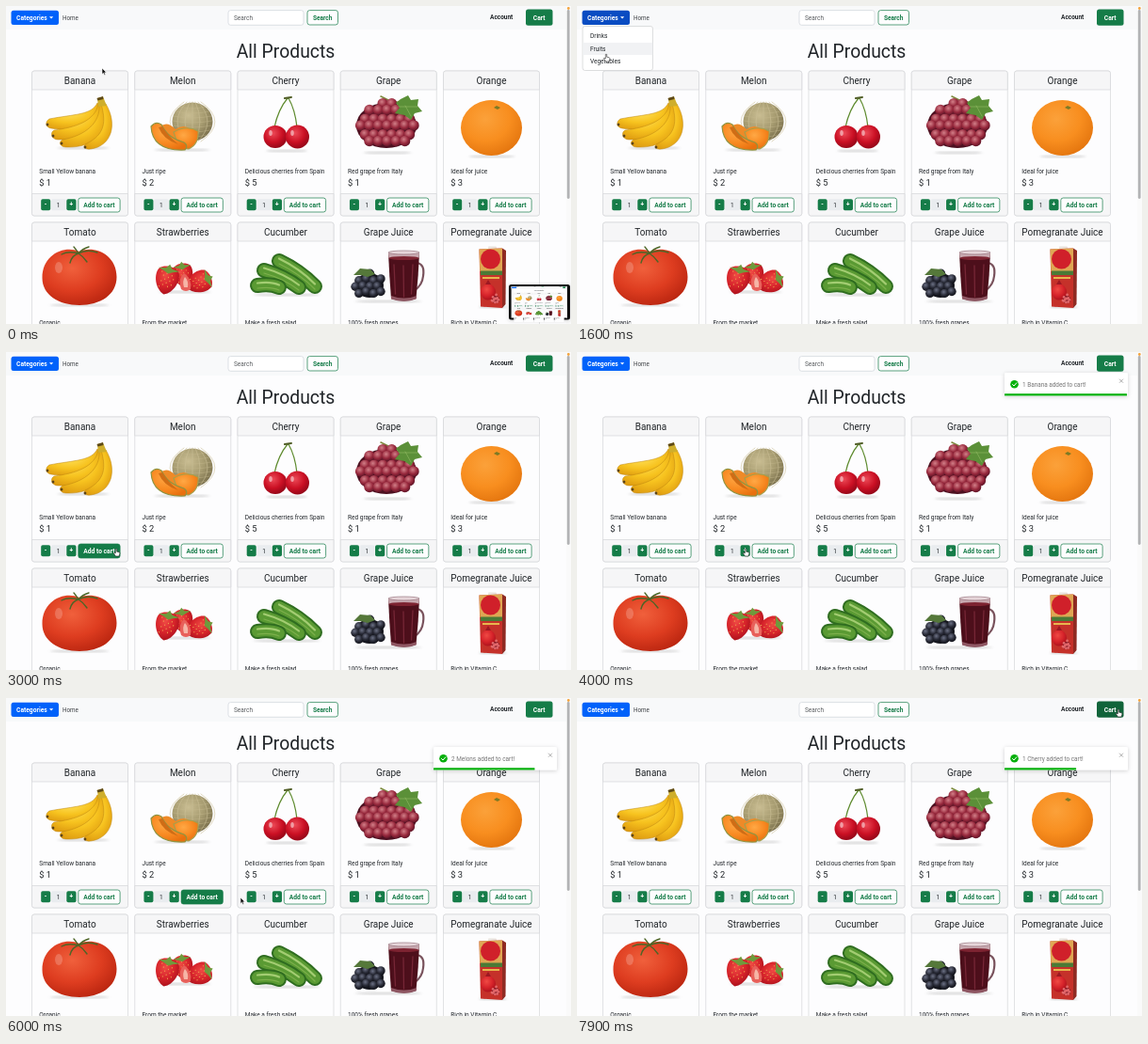
An HTML page for the animation above (8 s loop, 600 px wide and 338 px high).

```html
<!DOCTYPE html>
<html lang="en">
<head>
<meta charset="utf-8">
<title>All Products</title>
<style>
html,body{margin:0;width:100%;height:100%;overflow:hidden;background:#fdfdfe}
svg{display:block;width:600px;height:338px;font-family:Roboto,"Open Sans",sans-serif}
text{white-space:pre}
</style>
</head>
<body>
<svg id="stage" viewBox="0 0 600 338"></svg>
<script>
const LOOP = 8000, GREEN = '#157c48', BLUE = '#0062fa', INK = '#212529';
const stage = document.getElementById('stage');

const text = (x, y, s, size = 6.5, o = '') => `<text x="${x}" y="${y}" font-size="${size}" fill="${INK}" ${o}>${s}</text>`;
const rect = (x, y, w, h, fill, r = 0, o = '') => `<rect x="${x}" y="${y}" width="${w}" height="${h}" rx="${r}" fill="${fill}" ${o}/>`;
const path = (d, fill, o = '') => `<path d="${d}" fill="${fill}" ${o}/>`;
const oval = (x, y, rx, ry, fill, o = '') => `<ellipse cx="${x}" cy="${y}" rx="${rx}" ry="${ry}" fill="${fill}" ${o}/>`;
const line = (d, color, w, o = '') => path(d, 'none', `stroke="${color}" stroke-width="${w}" stroke-linecap="round" ${o}`);
const MID = 'text-anchor="middle" ', BOLD = 'font-weight="600" ';
const white = 'style="fill:#fff"', green = `style="fill:${GREEN}"`;

const ball = (id, a, b, c) => `<radialGradient id="${id}" cx=".4" cy=".34" r=".72"><stop stop-color="${a}"/><stop offset=".55" stop-color="${b}"/><stop offset="1" stop-color="${c}"/></radialGradient>`;
const defs = `<defs>
${ball('yellow', '#ffe25e', '#f7c31f', '#dd990f')}${ball('rind', '#c9bd92', '#a69b70', '#756b48')}
${ball('flesh', '#ffa845', '#f88a22', '#e8700f')}${ball('cherry', '#ec4a57', '#cb1024', '#8b0516')}
${ball('grape', '#d27f88', '#98293d', '#541022')}${ball('orange', '#fba13a', '#f88e1f', '#e2730d')}
${ball('tomato', '#f0603c', '#de3d20', '#b8240f')}${ball('berry', '#ef4a44', '#d6232a', '#a50f1b')}
${ball('black', '#6b7084', '#282a36', '#0e0f15')}
<filter id="shade" x="-20%" y="-40%" width="140%" height="200%"><feDropShadow dx="0" dy="1" stdDeviation="2" flood-opacity=".18"/></filter>
<filter id="soft"><feGaussianBlur stdDeviation="1.2"/></filter>
<clipPath id="view"><rect width="594.5" height="338"/></clipPath></defs>`;

const shadow = (x, y, rx) => oval(x, y, rx, 1.6, '#bbb', 'opacity=".5" filter="url(#soft)"');

// Hexagonally packed berries inside an ellipse, over a dark core
function cluster(cx, cy, rx, ry, r, fill, core) {
  let out = oval(cx, cy, rx, ry, core);
  for (let row = 0, y = cy - ry; y <= cy + ry; y += r * 1.45, row++)
    for (let x = cx - rx + (row % 2) * r * .8; x <= cx + rx; x += r * 1.65)
      if (((x - cx) / rx) ** 2 + ((y - cy) / ry) ** 2 < 1.05) out += oval(x.toFixed(1), (y + Math.sin(x * 2)).toFixed(1), r, r, fill);
  return out;
}

const banana = () => {
  const skin = 'stroke="#bd850f" stroke-width=".5"';
  return shadow(82, 151, 28) + [
    'M97 103C91 116 72 115 46 120C41 123 42 129 48 130C76 135 96 126 103 106Z',
    'M98 104C95 122 74 129 51 132C46 135 49 142 55 142C80 143 100 132 104 106Z',
    'M99 104C101 124 84 138 60 142C55 145 58 150 64 150C92 151 110 136 106 105Z',
    'M101 104C106 122 106 136 86 146C80 149 84 153 90 152C112 149 119 126 106 104Z'
  ].map(d => path(d, 'url(#yellow)', skin)).join('') +
    path('M97 98L103 96.500L107 106L98 107Z', '#cfae2c') + path('M96.500 98L103 96L103.500 99L97.500 100.500Z', '#5e4a18') +
    [[44, 126], [50, 138], [59, 146], [84, 150]].map(([x, y]) => oval(x, y, 1.4, 1.6, '#5c4318')).join('');
};

const melon = () => {
  let net = '';
  for (let i = -3; i <= 3; i++) net += line(`M${198 + i * 3} 102Q${198 + i * 13} 123 ${198 + i * 3} 144`, '#cbbf97', .6);
  for (let y = 107; y < 142; y += 5) net += line(`M${198 - Math.sqrt(440 - (y - 123) ** 2)} ${y}Q198 ${y + 4} ${198 + Math.sqrt(440 - (y - 123) ** 2)} ${y}`, '#c4b88d', .4);
  return shadow(187, 153, 30) + oval(198, 123, 21.5, 20.5, 'url(#rind)') + net +
    path('M162 129Q171 121 180 131Q189 125 196 131Q191 142 180 144Q167 140 162 129Z', '#ee8a28') +
    path('M178 134Q192 126 204 133Q205 147 194 152Q183 152 178 134Z', 'url(#flesh)', 'stroke="#a3a04d" stroke-width="1.1"') +
    path('M154 128C155 146 168 154 190 153C193 150 192 147 189 145C176 141 170 136 165 126Q159 122 154 128Z', 'url(#flesh)', 'stroke="#8f9440" stroke-width="1.2"') +
    path('M162 129Q167 142 183 147Q172 138 166 128Z', '#cf6d16');
};

const cherry = () => shadow(298, 154, 22) +
  line('M299 98Q289 110 285 129M300 98Q307 110 309 129', '#5d8a2d', 1.2) + line('M296 98L303 97', '#4f5c25', 2) +
  oval(286, 139, 12.5, 12, 'url(#cherry)') + oval(309.5, 139, 12.5, 12.5, 'url(#cherry)') +
  oval(281, 135, 1.8, 3, '#fff', 'opacity=".5"') + oval(304, 135, 1.8, 3, '#fff', 'opacity=".5"');

const grapes = () => shadow(405, 156, 26) + line('M398 96L412 103L425 100', '#7d8a3d', 1.6) +
  cluster(404, 127, 32, 24, 5.7, 'url(#grape)', '#4c1020') +
  path('M414 103L419 99L427 95L430 100L438 99L437 106L442 112L434 114L430 121L423 116L413 114L418 108Z', '#5b9038') +
  line('M417 107L437 107M424 106L430 117', '#9cc26c', .5);

const orange = () => shadow(516, 160, 25) + oval(515.5, 129.5, 32.5, 29.5, 'url(#orange)') +
  path('M518 108L521 106L525 108L522 110Z', '#7b7a25');

const tomato = () => shadow(78, 318, 32) +
  path('M78 261C92 254 117.500 263 117.500 288C117.500 307 100 318 78 318C56 318 38.500 307 38.500 289C38.500 264 62 254 78 261Z', 'url(#tomato)') +
  line('M77 263Q66 260 59 264M77 263Q70 265 68 273M77 263Q82 266 86 272M77 263Q86 258 97 262M77 263Q74 258 72 256M77 263Q81 258 88 256', '#4c6526', 1.4) +
  oval(56, 278, 4, 6, '#fff', 'opacity=".2"');

function strawberry(x, y, angle, k) {
  let seeds = '';
  for (let i = 0; i < 14; i++) seeds += oval(-6 + (i * 5) % 13, -6 + i * 1.1, .5, .7, '#f0a050');
  return `<g transform="translate(${x} ${y}) rotate(${angle}) scale(${k})">${path('M0 15C-9 12-14-2-9-9C-5-13 5-13 9-9C14-2 9 12 0 15Z', 'url(#berry)')}${seeds}${path('M-10-9L-3-10L0-14L3-10L10-9L4-7L0-5L-4-7Z', '#6f9a3c')}</g>`;
}
const strawberries = () => shadow(190, 304, 28) + strawberry(188, 285, -8, .95) + strawberry(171, 290, 12, 1.12) + strawberry(206, 293, 68, 1.05) +
  path('M186 301Q182 290 189 284Q198 290 196 301Q191 305 186 301Z', '#e8605a') + path('M189 299Q187 292 190 288Q194 292 193 299Z', '#f6b5a6');

function cucumber(x1, y1, x2, y2) {
  const d = `M${x1} ${y1}Q${(x1 + x2) / 2 + 3} ${(y1 + y2) / 2 - 3} ${x2} ${y2}`;
  return line(d, '#2f6d20', 16) + line(d, '#5a9a33', 12) +
    line(d, '#a3cd72', 2.2, 'transform="translate(0 -2.5)"') + line(d, '#7db04c', 1.2, 'transform="translate(0 3)"');
}
const cucumbers = () => shadow(298, 307, 36) + cucumber(290, 271, 328, 298) + cucumber(274, 281, 311, 299) + cucumber(267, 297, 290, 299);

const juice = () => shadow(406, 314, 36) +
  line('M436 273Q445 274 443 287Q442 297 434 302', '#79525c', 2.2) +
  path('M406 262L439 262Q438 287 435.500 311Q423 316 409 311Q407 287 406 262Z', '#4d0f1b') +
  path('M406 262L439 262L438.500 268L406.500 268Z', '#c9aab1') + oval(422.5, 262, 16.5, 2, '#e6d5d9', 'stroke="#8a6570" stroke-width=".6"') +
  oval(422.5, 268, 16, 2, '#7d2331') + line('M412 275L413.500 306M422 276L422.500 309M432 275L430.500 306', '#873142', 1.3, 'opacity=".7"') +
  path('M409 308Q423 313 436 308L435.500 311.500Q423 316 409 311.500Z', '#8f5763') +
  cluster(386, 297, 15, 13, 4.7, 'url(#black)', '#14151c') +
  path('M369 286L376 279L387 280L392 285L384 288L377 286Z', '#55783a');

const carton = () => shadow(517, 320, 15) + rect(512, 255.500, 9, 4, '#e9e3dc', 1) +
  path('M502.500 258.500L527 257.500L527 321L504 319.500Z', '#c5312a') + path('M527 257.500L531 260L530.500 317L527 321Z', '#8f2a22') +
  path('M502.500 258.500L527 257.500L527 282L503.300 282Z', '#dfa653') + oval(514.5, 269, 10.5, 10.5, '#d0202a') +
  rect(504, 281.5, 23, 4.5, '#4b7a36') + rect(506, 288, 18, 2, '#e7b64e') +
  oval(512, 304, 8, 8.500, 'url(#berry)') + path('M509 296L512 291L515 296Z', '#9d1822') +
  cluster(520, 312, 4, 4, 1.4, '#e2676a', '#771421');

const products = [
  ['Banana', 'Small Yellow banana', 1, banana], ['Melon', 'Just ripe', 2, melon],
  ['Cherry', 'Delicious cherries from Spain', 5, cherry], ['Grape', 'Red grape from Italy', 1, grapes],
  ['Orange', 'Ideal for juice', 3, orange], ['Tomato', 'Organic', 2, tomato],
  ['Strawberries', 'From the market', 4, strawberries], ['Cucumber', 'Make a fresh salad', 1, cucumbers],
  ['Grape Juice', '100% fresh grapes', 3, juice], ['Pomegranate Juice', 'Rich in Vitamin C', 3, carton]
];

function card([name, note, price, art], i) {
  const x = 27.5 + (i % 5) * 109.25, y = i < 5 ? 69 : 230;
  const frame = 'stroke="#d5d6d8" stroke-width=".7"';
  let out = rect(x, y, 102, 154, '#fdfdfe', 2.5, frame) +
    path(`M${x} ${y + 20}v-17.500q0-2.500 2.500-2.500h97q2.500 0 2.500 2.500v17.500z`, '#f6f6f7', frame) +
    text(x + 51, y + 13.8, name, 10, MID) + art() +
    text(x + 7.8, y + 109.3, note) + text(x + 7.8, y + 122, '$ ' + price, 9.3);
  if (i < 5) out += path(`M${x} 199.500h102v21q0 2.500-2.500 2.500h-97q-2.500 0-2.500-2.500z`, '#f6f6f7', frame) +
    rect(x + 9.7, 205.3, 10, 12, GREEN, 1.8) + text(x + 14.6, 213.2, '-', 6.5, MID + BOLD + white) +
    rect(x + 20.5, 205.3, 15.5, 12, '#e9ecef', 1.5) + text(x + 28, 213.6, '1', 6.5, `${MID} id="qty${i}"`) +
    rect(x + 36.8, 205.3, 10.2, 12, GREEN, 1.8) + text(x + 41.9, 213.4, '+', 6.5, MID + BOLD + white) +
    rect(x + 49.3, 204, 44.3, 15, '#fdfdfe', 2.5, `id="add${i}" stroke="${GREEN}" stroke-width=".7"`) +
    text(x + 71.4, 213.9, 'Add to cart', 6.7, `${MID} ${BOLD} id="label${i}"`);
  return out;
}

const toasts = [['1 Banana added to cart!', 3990], ['2 Melons added to cart!', 5720], ['1 Cherry added to cart!', 7245]];
const LIFE = 1565;
const toast = ([label], i) => `<g id="toast${i}"><g filter="url(#shade)">${rect(454, 22, 131, 24.5, '#fff', 1.5)}</g>
${oval(464.5, 34.3, 4.3, 4.3, '#07b00c')}${line('M462.500 34.500L464 36L466.800 32.800', '#fff', 1)}
${text(473, 36.7, label, 6.4, 'style="fill:#757575"')}${line('M576.300 29L579.700 32.400M579.700 29L576.300 32.400', '#999', .8)}
${rect(454, 44.2, 131, 2.3, '#07b00c', .5, `id="bar${i}"`)}</g>`;

stage.innerHTML = defs + `<g id="page">${rect(0, 0, 600, 338, '#fdfdfe')}${rect(0, 0, 595, 25, '#f8f9fa')}
${rect(5.5, 4.8, 50.5, 15.2, BLUE, 2.5, 'id="menuButton"')}${text(11, 14.8, 'Categories', 6.7, BOLD + white)}${path('M46 11.200h4.200l-2.100 2.200z', '#fff')}
${text(60, 14.9, 'Home', 6.3, 'fill-opacity=".85"')}
${rect(236, 4.6, 80, 15.7, '#fff', 2.5, 'stroke="#ced4da" stroke-width=".7"')}${text(242, 14.8, 'Search', 6.5, 'fill-opacity=".75"')}
${rect(320, 4.6, 32.5, 15.4, '#fdfdfe', 2.5, `stroke="${GREEN}" stroke-width=".7"`)}${text(336.2, 14.8, 'Search', 6.6, MID + BOLD + green)}
${text(514, 14.2, 'Account', 6.5, BOLD)}${rect(552, 3.5, 28.5, 17.2, GREEN, 2.5, 'id="cart"')}${text(566.2, 14.6, 'Cart', 6.7, MID + BOLD + white)}
${text(297, 54.8, 'All Products', 19.4, MID)}${products.map(card).join('')}
${rect(595, 0, 5, 338, '#fafafa')}${rect(595.8, 4, 2.8, 201, '#b2b3b5', 1.4)}</g>${oval(597.3, 2.5, 1.4, 1.4, '#f3a33c')}
<g id="menu">${rect(6, 21.5, 74.5, 47, '#fff', 2.5, 'stroke="#cfd0d2" stroke-width=".7"')}${rect(6.4, 39, 73.8, 13, '#f1f2f4', 0, 'id="row"')}
${['Drinks', 'Fruits', 'Vegetables'].map((s, i) => text(14, 34.3 + i * 13.5, s)).join('')}</g>
<g clip-path="url(#view)">${toasts.map(toast).join('')}</g>
<g id="thumb">${rect(534, 296, 65, 37.5, '#111', 2.5, 'filter="url(#shade)"')}<use href="#page" transform="translate(536.600 298) scale(.099)"/></g>
<g id="pointer" stroke="#fff" stroke-width=".6">${path('M0-1V5.500L1.500 4.200L2.600 6.600L3.700 6.100L2.700 3.800L4.700 3.700Z', '#111', 'id="arrow"')}
${path('M-.7-1.500Q0-2.300.7-1.500V1.200L3.300 1.800Q4 2.200 3.800 3.500L3 6H-.6L-2.700 2.700Q-2.500 1.600-.7 2.900Z', '#fff', 'id="hand" stroke="#222"')}</g>`;

const el = Object.fromEntries([...stage.querySelectorAll('[id]')].map(n => [n.id, n]));
const clamp = v => Math.min(1, Math.max(0, v));
const ramp = (t, a, b) => clamp((t - a) / (b - a));
const smooth = p => p * p * (3 - 2 * p);
const show = (node, on) => node.style.display = on ? '' : 'none';

const moves = [[0, 102, 67], [150, 102, 67], [800, 33, 14], [1100, 33, 14], [1350, 37, 33], [1600, 31, 53], [1800, 29, 58],
  [2100, 31, 14], [2250, 31, 14], [2750, 103, 196], [3000, 117, 211], [3600, 117, 211], [3900, 179, 211], [4300, 179, 211],
  [4600, 207, 215], [5400, 207, 215], [6000, 249, 213], [6250, 318, 211], [6530, 318, 211], [6800, 380, 119], [7400, 562, 16], [7900, 575, 14], [8000, 575, 14]];
const hovers = [[2780, 3700], [4420, 6150], [6170, 6650]];

function position(t) {
  const i = Math.max(1, moves.findIndex(m => m[0] > t)), a = moves[i - 1], b = moves[i];
  const p = smooth(ramp(t, a[0], b[0]));
  return [a[1] + (b[1] - a[1]) * p, a[2] + (b[2] - a[2]) * p];
}

function draw(t) {
  const [x, y] = position(t);
  const inside = (x1, y1, x2, y2) => x > x1 && x < x2 && y > y1 && y < y2;
  const open = t >= 1000 && t < 2150;
  const offset = (x - 27.5) % 109.25;
  const link = inside(5, 4, 57, 20) || inside(552, 3, 581, 21) || (open && inside(6, 21, 80, 69)) ||
    (inside(27, 204, 570, 219) && offset > 36 && offset < 94);
  el.pointer.setAttribute('transform', `translate(${x.toFixed(2)} ${y.toFixed(2)})`);
  show(el.hand, link);
  show(el.arrow, !link);

  show(el.menu, open);
  el.row.setAttribute('y', 25.5 + 13.5 * Math.max(0, Math.min(2, Math.floor((y - 27) / 13.5))));
  show(el.row, y > 24);
  el.menuButton.setAttribute('fill', open || inside(5, 4, 57, 20) ? '#0a4cc2' : BLUE);
  el.cart.setAttribute('fill', inside(552, 3, 581, 21) ? '#11643a' : GREEN);
  el.qty1.textContent = t >= 4150 && t < 5370 ? 2 : 1;

  for (let i = 0; i < 5; i++) {
    const [a, b] = hovers[i] || [LOOP, LOOP];
    const p = ramp(t, a, a + 150) * (1 - ramp(t, b, b + 180));
    const mix = (from, to) => Math.round(from + (to - from) * p);
    el['add' + i].setAttribute('fill', `rgb(${mix(253, 21)},${mix(253, 124)},${mix(254, 72)})`);
    el['label' + i].style.fill = p > .5 ? '#fff' : GREEN;
  }

  toasts.forEach(([, start], i) => {
    const end = start + LIFE, enter = ramp(t, start - 350, start), leave = ramp(t, end, end + 350);
    show(el['toast' + i], enter > 0 && leave < 1);
    const dx = 145 * (1 - enter) ** 3 + 150 * leave ** 2;
    const gone = i ? toasts[i - 1][1] + LIFE + 620 : 0;
    const dy = i ? 30 * (1 - smooth(ramp(t, gone, gone + 180))) : 0;
    el['toast' + i].setAttribute('transform', `translate(${dx.toFixed(2)} ${dy.toFixed(2)})`);
    el['bar' + i].setAttribute('width', (131 * (1 - ramp(t, start, end))).toFixed(2));
  });

  const away = ramp(t, 300, 700);
  show(el.thumb, away < 1);
  el.thumb.setAttribute('transform', `translate(${70 * away ** 2} 0)`);
}

const begin = performance.now();
function tick() {
  draw((performance.now() - begin) % LOOP);
  requestAnimationFrame(tick);
}
tick();
</script>
</body>
</html>
```
